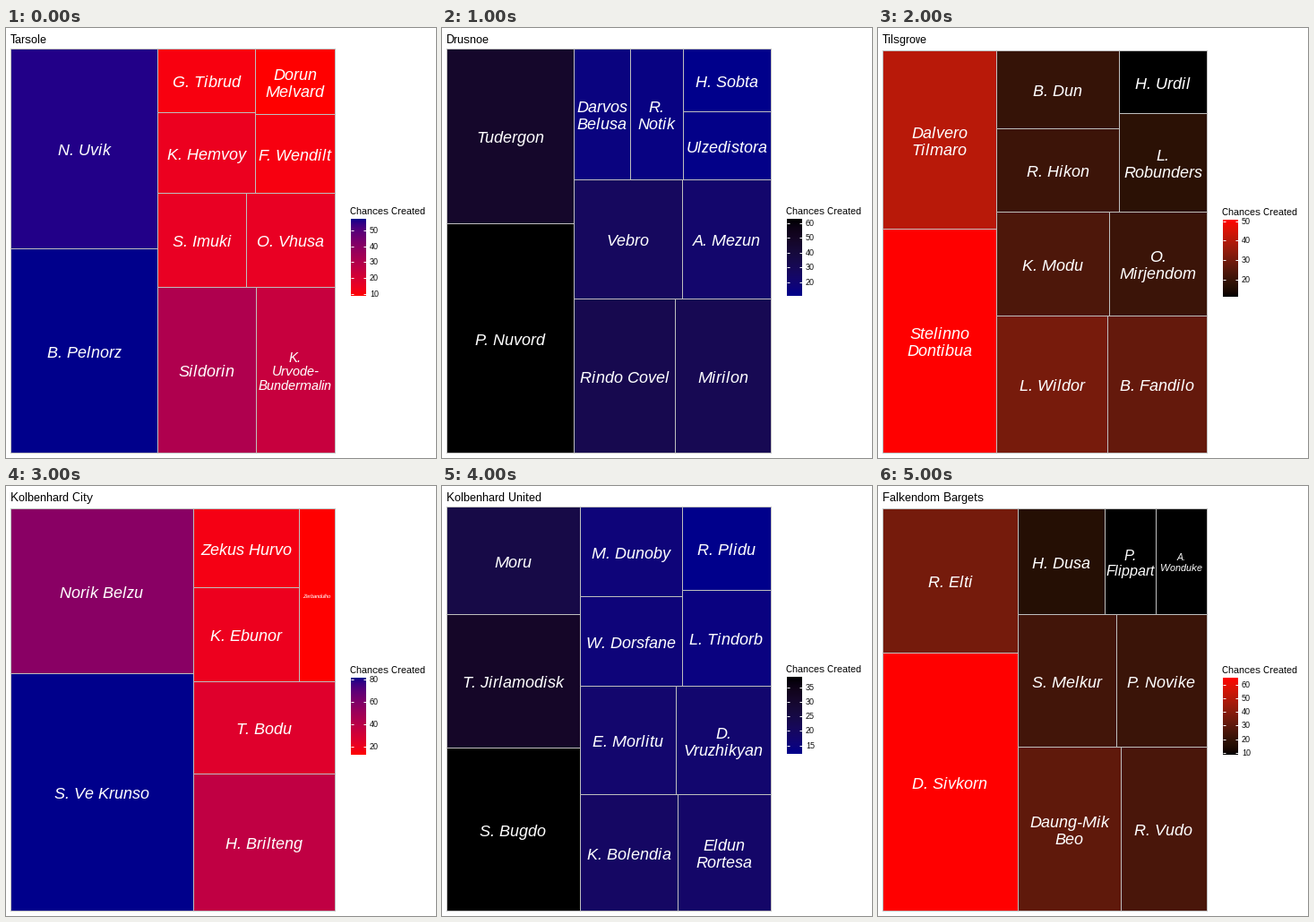
A matplotlib script for the animation above (6 s loop, 480x480 px).

```python
import numpy as np
import matplotlib.pyplot as plt
from matplotlib.animation import FuncAnimation
from matplotlib.patches import Rectangle

SIZE, DPI = 480, 100
PT = 72 / DPI
LEFT, RIGHT, BOTTOM = 5, 367, 474
BORDER = "#bebebe"

plt.rcParams["text.hinting"] = "native"
plt.rcParams["text.hinting_factor"] = 1

RED, NAVY, BLACK = (255, 0, 0), (0, 0, 139), (0, 0, 0)
TO_XYZ = np.array([[0.4124564, 0.3575761, 0.1804375],
                   [0.2126729, 0.7151522, 0.0721750],
                   [0.0193339, 0.1191920, 0.9503041]])
WHITE = TO_XYZ.sum(axis=1)
EPS, KAPPA = 216 / 24389, 24389 / 27


def to_lab(rgb):
    c = np.array(rgb) / 255
    c = np.where(c > 0.04045, ((c + 0.055) / 1.055) ** 2.4, c / 12.92)
    r = TO_XYZ @ c / WHITE
    x, y, z = np.where(r > EPS, np.cbrt(r), (KAPPA * r + 16) / 116)
    return np.array([116 * y - 16, 500 * (x - y), 200 * (y - z)])


def to_rgb(lab):
    y = (lab[0] + 16) / 116
    f = np.array([y + lab[1] / 500, y, y - lab[2] / 200])
    r = np.where(f ** 3 > EPS, f ** 3, (116 * f - 16) / KAPPA)
    c = np.clip(np.linalg.solve(TO_XYZ, r * WHITE), 0, 1)
    return np.where(c > 0.0031308, 1.055 * c ** (1 / 2.4) - 0.055, 12.92 * c)


def blend(low, high, t):
    """Mix two colours in Lab space."""
    a, b = to_lab(low), to_lab(high)
    return to_rgb(a + (b - a) * t)


# A tile tree: V splits at an x position, H splits at a y position.
def V(pos, first, second):
    return "x", pos, first, second


def H(pos, first, second):
    return "y", pos, first, second


def tiles(node, x0, y0, x1, y1):
    if isinstance(node, str):
        return [(node, x0, y0, x1, y1)]
    axis, p, a, b = node
    if axis == "x":
        return tiles(a, x0, y0, p, y1) + tiles(b, p, y0, x1, y1)
    return tiles(a, x0, y0, x1, p) + tiles(b, x0, p, x1, y1)


SMALL = {"K.\nUrvode-\nBundermalin": 14.7, "Zerbandulho": 5.8,
         "P.\nFlippart": 16.3, "A.\nWonduke": 11}

# title, low colour, high colour, legend (values, first y, step), tiles
CHARTS = [
    ("Tarsole", RED, NAVY, (range(50, 9, -10), 226.5, 17.7),
     V(169, H(246, "N. Uvik", "B. Pelnorz"),
       H(184, V(278, H(94, "G. Tibrud", "K. Hemvoy"),
                H(96, "Dorun\nMelvard", "F. Wendilt")),
         H(289, V(268, "S. Imuki", "O. Vhusa"),
           V(279, "Sildorin", "K.\nUrvode-\nBundermalin"))))),
    ("Drusnoe", NAVY, BLACK, (range(60, 19, -10), 218, 16.5),
     V(147, H(218, "Tudergon", "P. Nuvord"),
       H(169, V(210, "Darvos\nBelusa",
                V(269, "R.\nNotik", H(93, "H. Sobta", "Ulzedistora"))),
         H(302, V(268, "Vebro", "A. Mezun"),
           V(260, "Rindo Covel", "Mirilon"))))),
    ("Tilsgrove", BLACK, RED, (range(50, 19, -10), 216, 21.7),
     V(132, H(224, "Dalvero\nTilmaro", "Stelinno\nDontibua"),
       H(205, V(269, H(112, "B. Dun", "R. Hikon"),
                H(95, "H. Urdil", "L.\nRobunders")),
         H(321, V(258, "K. Modu", "O.\nMirjendom"),
           V(256, "L. Wildor", "B. Fandilo"))))),
    ("Kolbenhard City", RED, NAVY, (range(80, 19, -20), 216, 25.2),
     V(209, H(209, "Norik Belzu", "S. Ve Krunso"),
       H(218, V(327, H(113, "Zekus Hurvo", "K. Ebunor"), "Zerbandulho"),
         H(321, "T. Bodu", "H. Brilteng")))),
    ("Kolbenhard United", NAVY, BLACK, (range(35, 14, -5), 225, 16.3),
     V(154, H(143, "Moru", H(292, "T. Jirlamodisk", "S. Bugdo")),
       H(223, V(268, H(123, "M. Dunoby", "W. Dorsfane"),
                H(116, "R. Plidu", "L. Tindorb")),
         H(344, V(261, "E. Morlitu", "D.\nVruzhikyan"),
           V(263, "K. Bolendia", "Eldun\nRortesa"))))),
    ("Falkendom Bargets", BLACK, RED, (range(60, 9, -10), 222, 15.3),
     V(156, H(186, "R. Elti", "D. Sivkorn"),
       H(143, V(253, "H. Dusa", V(310, "P.\nFlippart", "A.\nWonduke")),
         H(291, V(266, "S. Melkur", "P. Novike"),
           V(271, "Daung-Mik\nBeo", "R. Vudo"))))),
]

fig = plt.figure(figsize=(SIZE / DPI, SIZE / DPI), dpi=DPI, facecolor="white")
ax = fig.add_axes([0, 0, 1, 1])


def write(x, y, text, px, **style):
    ax.text(x, y, text, fontsize=px * PT, family="Liberation Sans",
            va="baseline", **style)


def draw_tile(name, x0, y0, x1, y1, color):
    # Whole coordinates snap to the centre of the pixel they start.
    ax.add_patch(Rectangle((x0, y0), x1 - x0, y1 - y0,
                           facecolor=color, edgecolor=BORDER, lw=PT))
    px = SMALL.get(name, 18.2)
    lines = name.split("\n")
    base = (y0 + y1) / 2 + 1.3 + 0.36 * px
    for i, line in enumerate(lines):
        y = base + (i - (len(lines) - 1) / 2) * px * 1.06
        write((x0 + x1) / 2, y, line, px, style="italic",
              color="white", ha="center")


def draw_legend(low, high, scale, shift):
    top, bottom = 213 + shift, 299 + shift
    write(384, 208 + shift, "Chances Created", 10.9, color="black")
    ramp = [[blend(low, high, t)] for t in np.linspace(1, 0, 86)]
    ax.imshow(ramp, extent=(385, 402, bottom, top), aspect="auto",
              interpolation="nearest")
    values, y0, step = scale
    for i, value in enumerate(values):
        y = int(y0 + i * step)
        for x in (385, 399):
            ax.plot([x, x + 3], [y, y], color="white", lw=PT,
                    solid_capstyle="butt")
        write(406, y + 3.4, str(value), 9.2, color="black")


def draw(i):
    title, low, high, scale, tree = CHARTS[i % len(CHARTS)]
    ax.clear()
    ax.axis("off")
    # Letters with a tail make the title line taller.
    shift = int(any(c in "gjpqy" for c in title))
    write(4.7, 17, title, 13, color="black")

    cells = tiles(tree, LEFT, 23 + 2 * shift, RIGHT, BOTTOM)
    areas = np.array([(c[3] - c[1]) * (c[4] - c[2]) for c in cells])
    shares = (areas - areas.min()) / (areas.max() - areas.min())
    for cell, t in zip(cells, shares):
        draw_tile(*cell, blend(low, high, t))

    draw_legend(low, high, scale, shift)
    ax.set_xlim(0, SIZE)
    ax.set_ylim(SIZE, 0)
    return []


anim = FuncAnimation(fig, draw, frames=len(CHARTS), init_func=lambda: draw(0),
                     interval=1000, repeat=True, repeat_delay=0)
plt.show()
```
